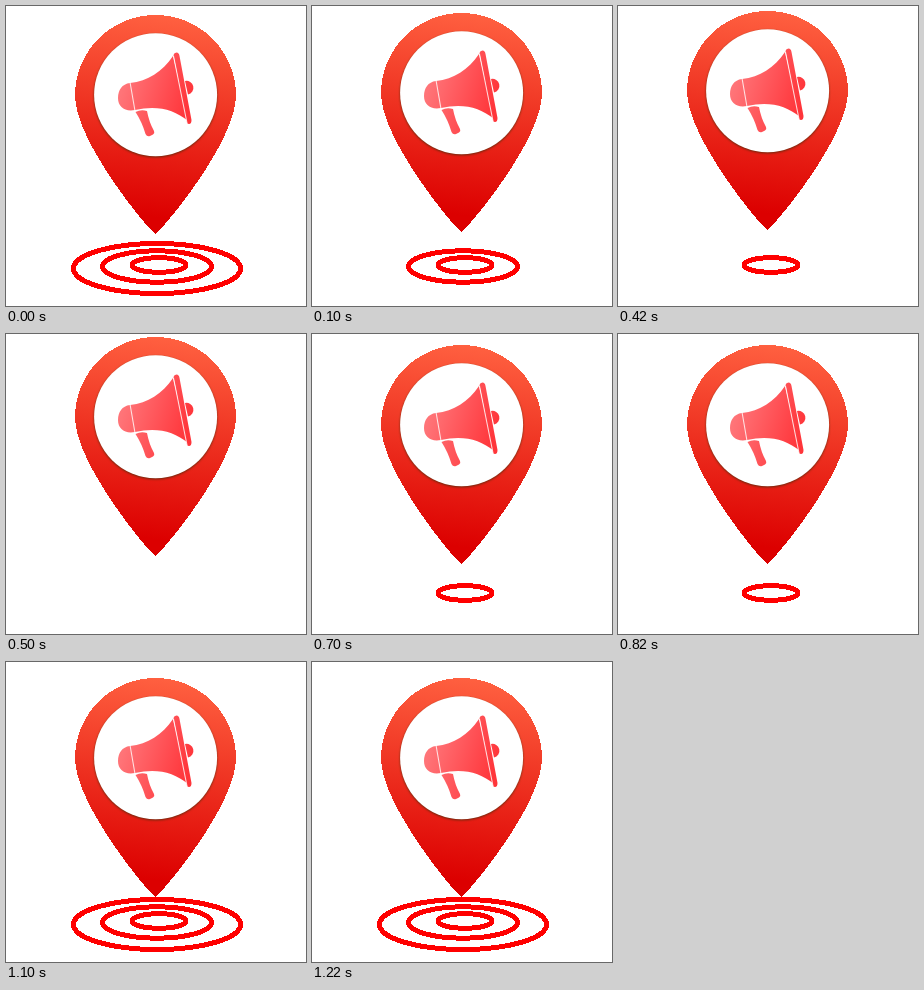
An HTML page for the animation above (1.3 s loop, 300 by 300 pixels).

```html
<!DOCTYPE html>
<html lang="en">
<head>
<meta charset="utf-8">
<title>Announcement pin</title>
<style>
  html, body { margin: 0; width: 100%; height: 100%; overflow: hidden; background: #fff; }
  svg { display: block; width: 100vw; height: 100vh; }
  .ring { fill: none; stroke: #ff0000; stroke-width: 5; shape-rendering: crispEdges; }
  .disc { fill: #fff; filter: drop-shadow(0 1.2px 1px rgba(60, 45, 10, .75)); }
</style>
</head>
<body>
<svg viewBox="0 0 300 300">
  <defs>
    <linearGradient id="body" x1=".54" y1="0" x2=".46" y2=".92">
      <stop offset="0" stop-color="#ff6040"/>
      <stop offset="1" stop-color="#dc0000"/>
    </linearGradient>
    <linearGradient id="horn" gradientUnits="userSpaceOnUse" x1="118" y1="78" x2="184" y2="98">
      <stop offset="0" stop-color="#ff7478"/>
      <stop offset="1" stop-color="#ff353a"/>
    </linearGradient>
  </defs>
  <g id="rings">
    <ellipse class="ring" cx="153" cy="259" rx="27" ry="7.3"/>
    <ellipse class="ring" cx="151" cy="260.5" rx="54.500" ry="15.700"/>
    <ellipse class="ring" cx="151" cy="262.5" rx="83.500" ry="25"/>
  </g>
  <g id="pin">
    <path fill="url(#body)" shape-rendering="crispEdges"
      d="M149.300 228C141 222 69 135 69 89.500A80.500 80.500 0 0 1 230 89.500C230 135 158 222 149.300 228Z"/>
    <circle class="disc" cx="149.600" cy="88.700" r="61.500"/>
    <g fill="url(#horn)">
      <path d="M129.500 106Q135 103 141 105Q143 116 148 125Q149 127 147 128.500L144 130Q141 131 139.500 128Q136 116 129.500 106Z"/>
      <path d="M179 75A6.800 6.800 0 0 1 182 88.500Z"/>
      <path d="M124 77C142 75 156 66 167 50L182 115C168 103 150 99 129 104C119 106 112 101 112 92C112 84 116 78 124 77Z"/>
      <path d="M167.500 49Q168 46.500 170.500 46.500Q173 46.500 173.500 50L185.500 114Q185.500 118 183 118Q181 118 180.500 115Z"/>
    </g>
    <path d="M124 76L129 105M167.500 50L181 117" stroke="#fff" stroke-opacity=".8" stroke-width="1.1"/>
  </g>
</svg>
<script>
  const pin = document.getElementById('pin');
  const rings = [...document.getElementById('rings').children];
  const LOOP = 1300, STEP = 200, HEAD_START = 100;
  const lifts = [0, -2, -4, -6, 2, 4, 7];

  function draw(now) {
    const step = Math.floor(((now % LOOP) + HEAD_START) / STEP);
    pin.setAttribute('transform', `translate(0 ${lifts[step]})`);
    const visible = Math.abs(3 - step);
    rings.forEach((ring, i) => ring.style.display = i < visible ? '' : 'none');
  }

  const start = performance.now();
  function tick() {
    draw(performance.now() - start);
    requestAnimationFrame(tick);
  }
  tick();
</script>
</body>
</html>
```
